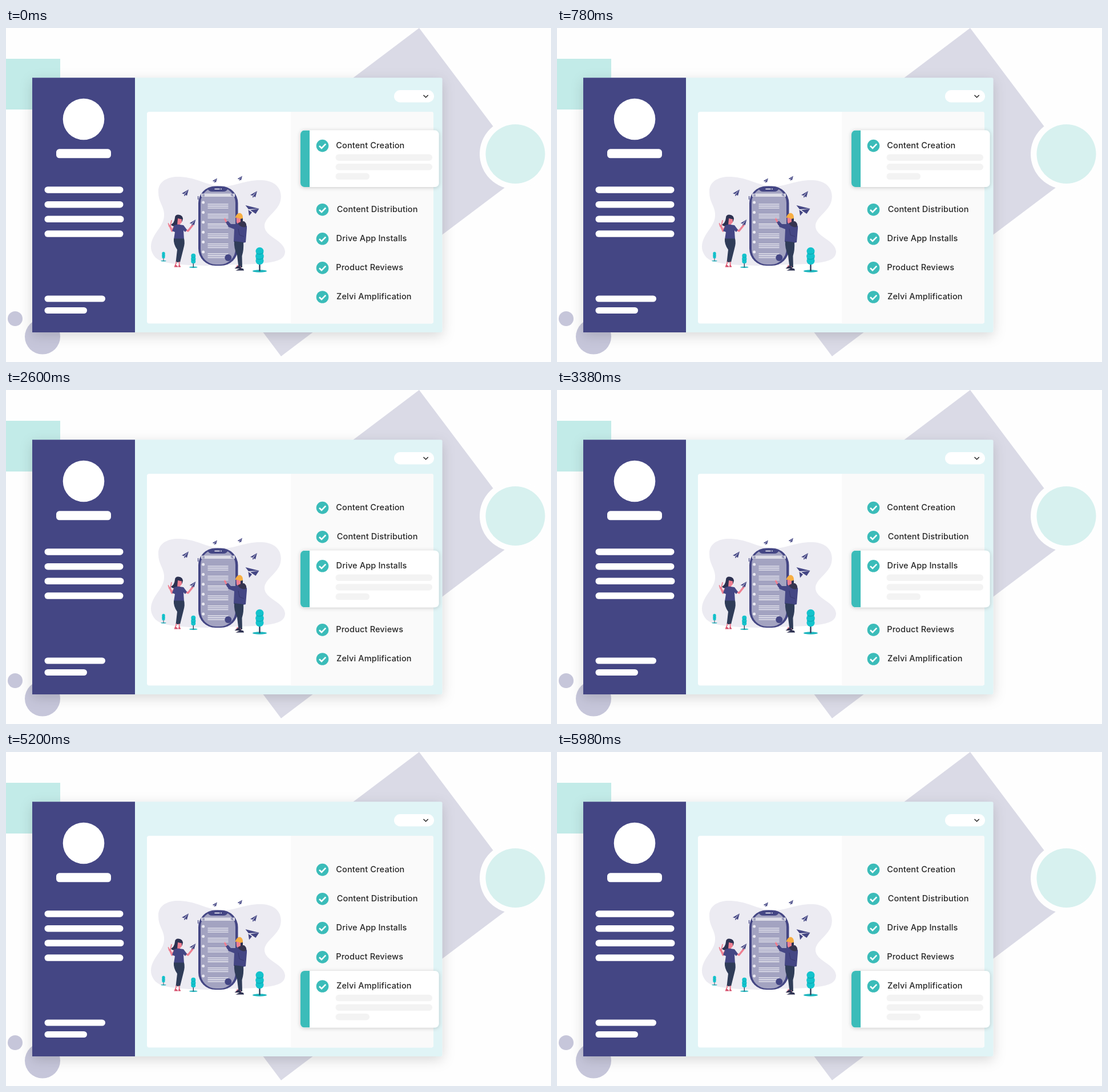
Write an HTML page that moves like this. It is 955x586 px and loops after 6.5 s.

```html
<!DOCTYPE html>
<html lang="en">
<head>
<meta charset="utf-8">
<title>Feature list</title>
<style>
html, body { margin: 0; width: 100%; height: 100%; overflow: hidden; background: #fefefe; }
svg { display: block; width: 955px; height: 586px; }
text { font: 500 14.5px Inter, "Open Sans", sans-serif; letter-spacing: .15px; fill: #272727; }
</style>
</head>
<body>
<svg viewBox="0 0 955 586" xmlns="http://www.w3.org/2000/svg">
<defs>
  <filter id="panelShadow" x="-10%" y="-10%" width="120%" height="125%">
    <feDropShadow dx="0" dy="6" stdDeviation="11" flood-color="#000" flood-opacity=".15"/>
  </filter>
  <filter id="cardShadow" x="-10%" y="-20%" width="120%" height="140%">
    <feDropShadow dx="0" dy="1" stdDeviation="3.5" flood-color="#000" flood-opacity=".2"/>
  </filter>
  <clipPath id="cardClip"><rect x="516" y="-27" width="242.5" height="99.5" rx="7"/></clipPath>
  <path id="plane" d="M6-6 -6 1-2 2ZM6-6-1 2.5 3 5ZM-2 2.5-1.5 6 .6 3.8Z"/>
  <g id="tree">
    <ellipse cy="0" rx="12.5" ry="2.2" fill="#1bb5bd"/>
    <path d="M0 0V-16" stroke="#30405c" stroke-width="2.4"/>
    <g fill="#14c3cc">
      <ellipse cy="-35" rx="7" ry="6.8"/><ellipse cy="-26" rx="7.3" ry="7"/><ellipse cy="-18" rx="7" ry="6.7"/>
    </g>
    <path d="M-6-31Q1-28 6.5-32M-6.5-22Q1-19 6.5-23" fill="none" stroke="#0ba5b2" stroke-width="1.2"/>
  </g>
</defs>

<path d="M0 54H95V143H0Z" fill="#c2ebe8"/>
<path d="M724 0 912.5 251 482 576 294 325Z" fill="#dadae6"/>
<circle cx="892" cy="221" r="62" fill="#fefefe"/>
<circle cx="892.5" cy="221" r="52" fill="#d7f1ef"/>
<g fill="#c6c6da"><circle cx="16" cy="510" r="13"/><circle cx="64" cy="541.5" r="31"/></g>

<rect x="46" y="87.3" width="718.5" height="446.7" rx="3" fill="#e0f4f6" filter="url(#panelShadow)"/>
<path d="M46 87.3H226V534H46Z" fill="#444684"/>
<g id="sidebar" fill="#fff"><circle cx="136" cy="160" r="36.3"/></g>
<rect x="680" y="109" width="70" height="21.5" rx="10.7" fill="#fff"/>
<path d="M731.5 117.7 735.6 121.8 739.7 117.7" fill="none" stroke="#252525" stroke-width="1.5"/>
<rect x="247" y="147" width="502" height="371.5" rx="4" fill="#fff"/>
<path d="M499 147H745Q749 147 749 151V514.5Q749 518.5 745 518.5H499Z" fill="#fafafa"/>

<path fill="#ecebf2" d="M267 288C266 268 285 260 305 261 335 263 345 273 370 277 400 281 415 266 448 267 475 268 485 285 481 303 476 325 445 335 455 355 462 368 488 375 489 392 489 408 470 411 445 413 420 416 395 414 370 417 350 417 300 417 275 410 255 404 250 385 257 370 265 352 278 345 277 325 276 312 267 305 267 288Z"/>

<g id="phone">
  <rect x="337" y="277.5" width="69.5" height="139.5" rx="30" fill="#444684"/>
  <path d="M336.6 295V301" stroke="#444684" stroke-width="1.3"/>
  <rect x="341" y="279.5" width="61" height="135.5" rx="27" fill="#a3a3c1"/>
  <path d="M353 281Q371 274.5 389 281 387 287 381 287H361Q355 287 353 281Z" fill="#444684"/>
  <path d="M366 282.5H374" stroke="#fff" stroke-width="1.5" stroke-linecap="round"/>
  <circle cx="377" cy="282.5" r=".9" fill="#fff"/>
  <path d="M342 290.5H401V296H342Z" fill="#dddde7"/>
  <path d="M344 292H348M344 293.5H348M344 295H348" stroke="#696a98" stroke-width=".7"/>
  <circle cx="396" cy="292.8" r="1.5" fill="none" stroke="#444684" stroke-width=".8"/>
  <path d="M397 294 398.5 295.5" stroke="#444684" stroke-width=".8"/>
</g>
<circle cx="389.3" cy="403" r="6" fill="#444684"/>

<g id="woman">
  <path d="M296 347 291 356 287 347M314 354 319 356 327 346" fill="none" stroke="#ee7f91" stroke-width="3.4" stroke-linejoin="round" stroke-linecap="round"/>
  <path d="M286 348 284.5 343M288 347 290 338" stroke="#ee7f91" stroke-width="1.8" stroke-linecap="round"/>
  <path d="M296 333Q296 327.5 302 327.5 309 328 309.5 335L309 339 300 346Q292 350 289 345 295 342 296 333Z" fill="#2d3151"/>
  <path d="M301 334H308V341Q305 343.5 304.5 346H300Z" fill="#ee7f91"/>
  <path d="M296 334Q298 328 304 328 310 329 310 336L301 334 299 342Z" fill="#2d3151"/>
  <path d="M295 346 301 344.5 311 346 317 354 314 358 311 355 312 371H294L296 358 291 356Z" fill="#444684"/>
  <path d="M294 369.5H312Q314 377 311 387L305 411H297.5L300 389Q293 379 294 369.5Z" fill="#2f3c58"/>
  <path d="M299 410 296 418M303.5 410 304 418" stroke="#ee7f91" stroke-width="2"/>
  <path d="M294.5 419.5 297 415 301 418V419.5ZM301.5 419.5 303 415 306 418V419.5Z" fill="#d6526f"/>
</g>

<g id="man">
  <path d="M387 342 383.5 335" stroke="#ee7f91" stroke-width="3" stroke-linecap="round"/>
  <path d="M403.5 333H413V343L407 345 404 341Z" fill="#ee7f91"/>
  <path d="M411 332H415V342H411Z" fill="#2d3151"/>
  <path d="M401.5 333Q404 324.5 410 324.5 415.5 326 415 334L410 335Q406 332 401.5 333Z" fill="#f7ae43"/>
  <path d="M404 344 413 340Q423 342 422 352L420 376Q409 379 399 375L400 353 390 349 385 341 389 338.5 394 344Z" fill="#444684"/>
  <path d="M406 343Q411 339 417 339 423 343 420 349 412 351 406 343Z" fill="#36344f"/>
  <path d="M407 352 409 363 417 366" fill="none" stroke="#36376d" stroke-width="1"/>
  <path d="M400 374 416 376Q417 389 413.5 400L414 420H407.5L405 399Q399 386 400 374Z" fill="#2f3c58"/>
  <path d="M406 416 403 422M410 418 412 424" stroke="#ee7f91" stroke-width="2"/>
  <path d="M400.5 422 407 417 411 419 412 422ZM402.5 425.5 411 421 416 422.5 417 425.5Z" fill="#2d3151"/>
</g>

<use href="#tree" transform="translate(444.5 426.5)"/>
<use href="#tree" transform="translate(328.3 419.7) scale(.57)"/>
<use href="#tree" transform="translate(276 408.6) scale(.38)"/>
<g id="planes" fill="#444684">
  <path d="M419.5 311 443.5 317 425 318ZM443.5 317 428 319.5 437.5 326ZM424.5 319 426 329.5 431 323.5 427.5 321Z"/>
</g>

<g id="card">
  <rect x="516" y="-27" width="242.5" height="99.5" rx="7" fill="#fff" filter="url(#cardShadow)"/>
  <path d="M516-27H532V72.5H516Z" fill="#3bbcb9" clip-path="url(#cardClip)"/>
  <g id="cardLines" fill="#f3f3f3"></g>
</g>
<g id="rows"></g>
</svg>

<script>
const STEP = 1300, TOP = 206.6, PITCH = 51.1, GAP = 61;
const items = [
  ["Content Creation", 578.2],
  ["Content Distribution", 579.7],
  ["Drive App Installs", 578.6],
  ["Product Reviews", 578.2],
  ["Zelvi Amplification", 579]
];
const byId = id => document.getElementById(id);

function add(parent, tag, attrs) {
  const el = document.createElementNS("http://www.w3.org/2000/svg", tag);
  for (const key in attrs) el.setAttribute(key, attrs[key]);
  return parent.appendChild(el);
}

function bar(parent, x, y, width, height, rx) {
  add(parent, "rect", { x, y, width, height, rx });
}

const side = byId("sidebar");
bar(side, 88, 212.3, 96, 16, 5.5);
for (let i = 0; i < 4; i++) bar(side, 67.5, 278.2 + i * 25.7, i === 2 ? 139 : 138, 11.5, 5.7);
bar(side, 67.5, 469.5, 106.5, 11, 5.5);
bar(side, 67.5, 490, 74.5, 11, 5.5);

[169.5, 169.5, 59.5].forEach((w, i) => bar(byId("cardLines"), 577.5, 14.8 + i * 16.6, w, 11.5, 5.7));

const phone = byId("phone");
for (let i = 0; i < 6; i++) {
  const y = 306 + i * 17.4;
  add(phone, "circle", { cx: 345.6, cy: y, r: 2.5, fill: "#ecebf2" });
  for (let j = 0; j < 3; j++)
    add(phone, "path", { d: `M353.5 ${y + 3.2 + j * 3.3}H389.5`, stroke: "#f0f0f5", "stroke-width": 1.3 });
}

[[314, 289.3, 1], [365.8, 267.6, .7], [409.8, 263.8, .7], [434, 292, 1], [327, 341.5, .9]].forEach(([x, y, s]) =>
  add(byId("planes"), "use", { href: "#plane", transform: `translate(${x} ${y}) scale(${s})` }));

const rows = items.map(([label, x]) => {
  const row = add(byId("rows"), "g", {});
  add(row, "circle", { cx: 554.5, cy: 0, r: 10.8, fill: "#3bbcb9" });
  add(row, "path", { d: "M549 .3 553 4.2 560.2-3.2", fill: "none", stroke: "#fff", "stroke-width": 2.6 });
  add(row, "text", { x, y: 4.4 }).textContent = label;
  return row;
});

const moveTo = (el, y) => el.setAttribute("transform", `translate(0 ${y})`);

let shown = -1;
function draw(now) {
  const active = Math.floor(now / STEP) % items.length;
  if (active !== shown) {
    shown = active;
    moveTo(byId("card"), TOP + active * PITCH);
    rows.forEach((row, i) => moveTo(row, TOP + i * PITCH + (i > active ? GAP : 0)));
  }
}

draw(0);
const start = performance.now();
function tick() {
  draw(performance.now() - start);
  requestAnimationFrame(tick);
}
requestAnimationFrame(tick);
</script>
</body>
</html>
```
